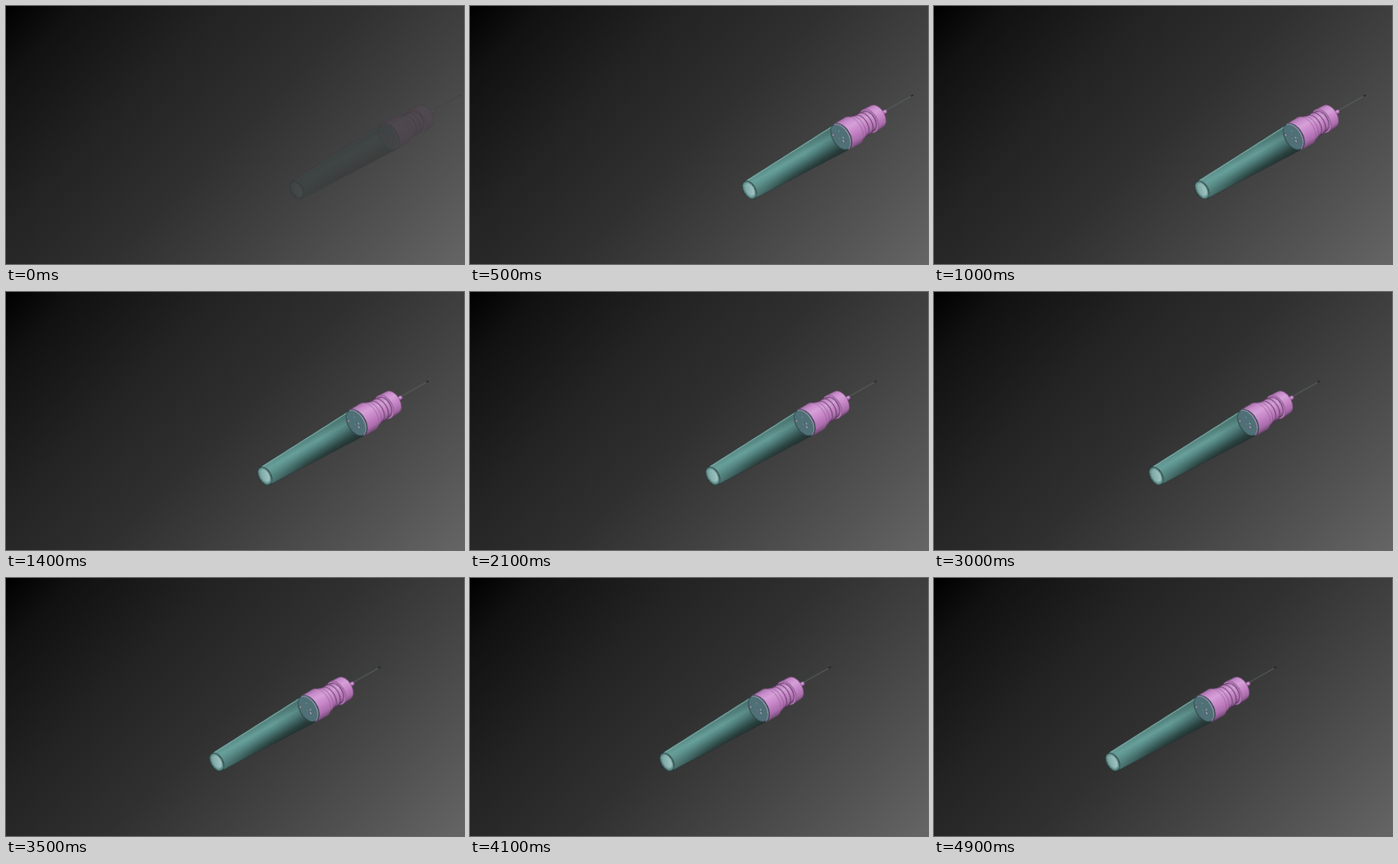
These frames come from a looping animation (600x338 px, 5 s). An HTML page:

```html
<!DOCTYPE html>
<html lang="en">
<head>
<meta charset="utf-8">
<title>Needle holder</title>
<style>
  html, body { margin: 0; width: 100%; height: 100%; overflow: hidden; }
  body { background: linear-gradient(135deg, #000 0%, #111112 10%, #232324 30%, #303031 50%, #424242 68%, #545454 85%, #656565 100%); }
  svg { display: block; width: 600px; height: 338px; }
</style>
</head>
<body>
<svg viewBox="0 0 600 338">
  <defs>
    <linearGradient id="pink" x2="0" y2="1">
      <stop offset="0" stop-color="#a670a8"/>
      <stop offset=".14" stop-color="#c88ccb"/>
      <stop offset=".32" stop-color="#d6a0d8"/>
      <stop offset=".6" stop-color="#c583c6"/>
      <stop offset=".85" stop-color="#a96caa"/>
      <stop offset="1" stop-color="#774a79"/>
    </linearGradient>
    <linearGradient id="teal" x2="0" y2="1">
      <stop offset="0" stop-color="#5d8f8b"/>
      <stop offset=".14" stop-color="#578883"/>
      <stop offset=".34" stop-color="#6aa39e"/>
      <stop offset=".5" stop-color="#588b87"/>
      <stop offset=".68" stop-color="#3f6663"/>
      <stop offset=".85" stop-color="#2b4341"/>
      <stop offset="1" stop-color="#253432"/>
    </linearGradient>
    <linearGradient id="shade">
      <stop offset="0" stop-color="#6aa09b" stop-opacity=".6"/>
      <stop offset=".35" stop-color="#5c8f8b" stop-opacity=".12"/>
      <stop offset=".6" stop-color="#1c2a2a" stop-opacity=".05"/>
      <stop offset="1" stop-color="#1c2a2a" stop-opacity=".3"/>
    </linearGradient>
    <linearGradient id="bore" x2="1" y2=".6">
      <stop offset="0" stop-color="#6f9d9a"/>
      <stop offset="1" stop-color="#a3c6c4"/>
    </linearGradient>
  </defs>
  <g id="tool">
    <g id="axis" transform="translate(367 240.5) rotate(-30)"></g>
  </g>
</svg>
<script>
const axis = document.getElementById('axis');
const SQUASH = 0.61;

function add(tag, attrs) {
  const el = document.createElementNS('http://www.w3.org/2000/svg', tag);
  for (const key in attrs) el.setAttribute(key, attrs[key]);
  axis.append(el);
}

// Solid of revolution along the x axis, seen from its near (left) end
function tube(x0, x1, r0, r1, fill, stroke = '#54365a', width = 0.5) {
  add('path', {
    d: `M${x0} ${-r0}L${x1} ${-r1}A${SQUASH * r1} ${r1} 0 0 1 ${x1} ${r1}` +
       `L${x0} ${r0}A${SQUASH * r0} ${r0} 0 0 1 ${x0} ${-r0}Z`,
    fill, stroke, 'stroke-width': width
  });
}

function disc(x, y, r, fill, stroke = 'none', width = 0.6) {
  add('ellipse', { cx: x, cy: y, rx: SQUASH * r, ry: r, fill, stroke, 'stroke-width': width });
}

function line(x1, y1, x2, y2, stroke, width) {
  add('line', { x1, y1, x2, y2, stroke, 'stroke-width': width });
}

// Needle and hub
line(205, -1, 246, -0.5, '#5a6863', 0.9);
line(243.5, -0.6, 247, -0.5, '#1d2121', 1.3);
tube(198, 205, 3, 2.6, 'url(#pink)');

// Cap, far parts first
tube(180, 192, 17, 16.3, 'url(#pink)');
disc(180, 0, 17, '#b87bba', '#6b4470');
tube(174, 179, 13.5, 14.5, 'url(#pink)', '#4a2f4e', 0.9);
tube(169, 173, 15.5, 15.5, 'url(#pink)', '#4a2f4e', 0.9);
tube(163, 167, 16, 15.5, 'url(#pink)', '#4a2f4e', 0.9);
tube(155, 161, 19.4, 16.8, 'url(#pink)', '#6b4470');
tube(138, 155, 19.3, 19.6, 'url(#pink)', '#7d5180');

// Barrel
tube(-1, 138, 13, 19, 'url(#teal)', '#20302f', 0.7);
tube(-1, 138, 13, 19, 'url(#shade)', 'none');
line(1, -12.2, 134, -17.9, '#8fbab6', 0.9);

// Bulkhead seen through the barrel
disc(138, -0.5, 18.9, '#4f7076', '#25383b', 0.8);
add('path', {
  d: 'M138 -19A11.5 19 0 0 1 138 18.6', fill: 'none', stroke: '#d3a5d8', 'stroke-width': 0.8
});
disc(130, -7.5, 2.1, '#b39dbb', '#33484e');
disc(135, 0, 1.5, '#a9bcc4', '#33484e');
disc(137.6, 6.1, 2.2, '#b7a3c0', '#33484e');
disc(139.5, 2, 0.9, '#c3d2d8');
disc(139, -8, 0.9, '#7d9ca3');

// Open mouth
disc(-1, 0, 13, '#5f928e', '#1f2e2d', 0.8);
disc(-1, -0.2, 11.6, '#7cada9', '#2a3f3e', 0.6);
disc(-0.8, -0.4, 9.8, 'url(#bore)', '#47716e', 0.6);

// Motion
const STEPS = 50;
const loop = { duration: 5000, iterations: Infinity };
const tool = document.getElementById('tool');

const slide = tool.animate(
  [{ transform: 'translateX(15px)' }, { transform: 'translateX(-135px)' }],
  { ...loop, easing: `steps(${STEPS}, end)` }
);

// [opacity, brightness] for each step of the fade-in
const fade = [[0.2, 0.55], [0.45, 0.7], [0.65, 0.8], [0.8, 0.9], [0.95, 1], [1, 1]];
const keys = fade.map(([opacity, light], i) => ({
  offset: i / STEPS, opacity, filter: `brightness(${light})`, easing: 'steps(1, end)'
}));
keys.push({ offset: 1, opacity: 1, filter: 'brightness(1)' });
const appear = tool.animate(keys, loop);

slide.startTime = appear.startTime = document.timeline.currentTime;
</script>
</body>
</html>
```
